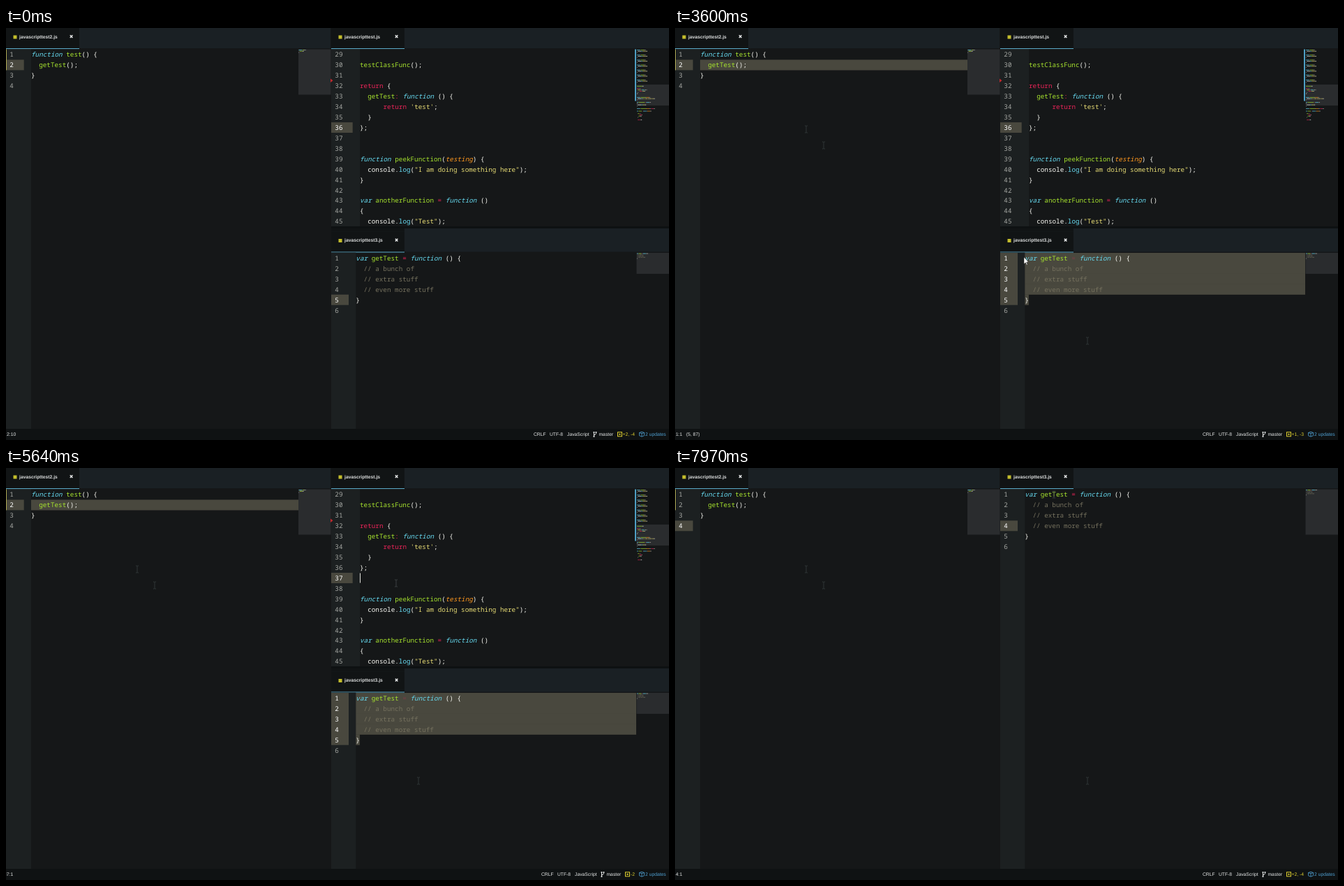
An HTML page for the animation above (8 s loop, 950 by 590 pixels).

```html
<!DOCTYPE html>
<html lang="en">
<head>
<meta charset="utf-8">
<title>Split editor panes</title>
<style>
  html, body { margin: 0; width: 100%; height: 100%; overflow: hidden; background: #151718; }
  svg { display: block; width: 950px; height: 590px; }
  text { text-rendering: geometricPrecision; }
  .code text { font: 500 9.31px "Noto Sans Mono", "DejaVu Sans Mono", monospace; fill: #f8f8f2; }
  .code .num { font-weight: 400; fill: #a4a6a2; }
  .code .on { font-weight: 500; fill: #fff; }
  .ui { font: 6.75px "Liberation Sans", sans-serif; fill: #e8eaea; }
  .tab { font-weight: bold; fill: #dcdede; }
  .kw { fill: #66d9ef; font-style: italic; }
  .fn { fill: #66d9ef; }
  .red { fill: #ea2458; }
  .name { fill: #a6e22e; }
  .str { fill: #e6db74; }
  .arg { fill: #fd971f; font-style: italic; }
  .note { fill: #75715e; }
  .plain { fill: #f8f8f2; }
  .yellow { fill: #dfd02f; }
  .blue { fill: #4f9fd0; }
</style>
</head>
<body>
<svg viewBox="0 0 950 590"><g id="scene"></g><g id="pointer"></g></svg>
<script>
const LOOP = 8000, ROW = 14.94, CHAR = 5.586, MINI_ROW = 1.787, MINI_CHAR = 0.6;
const SELECTED = '#49483e', TAB_BAR = '#1a2024', VIEW = '#2a2c2e';

const leftFile = ['function test() {', '  getTest();', '}', ''];
const bottomFile = ['var getTest = function () {', '  // a bunch of', '  // extra stuff',
  '  // even more stuff', '}', ''];
const block = ['function testMore() {', '  console.log("Testing");', '}', ''];
const topFile = [...Array(7).fill(block).flat(),
  '', 'testClassFunc();', '', 'return {', '  getTest: function () {', "      return 'test';", '  }', '};',
  '', '', 'function peekFunction(testing) {', '  console.log("I am doing something here");', '}', '',
  'var anotherFunction = function ()', '{', '  console.log("Test");', '}', '',
  'function testSomething(testing) { return; }', '', 'var testLast = function (testing) {', '',
  '  test: {', '      return;', '    test();', '  }', '', '  return {};'];

const KINDS = ['note', 'str', 'kw', 'red', 'fn', 'arg', 'name'];
const RULES = /(\/\/.*)|(".*?"|'.*?')|\b(function|var)\b|(\breturn\b|[=:])|\b(log)\b|\b(testing)\b|\b(test\w*|getTest|peekFunction|anotherFunction)\b/g;

function tokens(line) {
  const out = [];
  let at = 0;
  for (const m of line.matchAll(RULES)) {
    if (m.index > at) out.push({ text: line.slice(at, m.index), kind: 'plain', col: at });
    out.push({ text: m[0], kind: KINDS[m.slice(1).findIndex(Boolean)], col: m.index });
    at = m.index + m[0].length;
  }
  if (at < line.length) out.push({ text: line.slice(at), kind: 'plain', col: at });
  return out;
}

const rect = (x, y, w, h, fill, extra = '') =>
  `<rect x="${x}" y="${y}" width="${w}" height="${h}" fill="${fill}" ${extra}/>`;
const label = (x, y, text, cls = '', extra = '') =>
  `<text x="${x}" y="${y}" class="ui ${cls}" ${extra}>${text}</text>`;

function tab(x, y, width, title) {
  return rect(x, y, width, 29, TAB_BAR) + rect(x, y, 105, 29, '#111415') +
    rect(x, y + 29, 105, 1, '#5aaac8') + rect(x + 10.5, y + 10.5, 5, 5, '#c4be2c') +
    label(x + 19, y + 14.5, title, 'tab') +
    `<path d="M${x + 91.8} ${y + 10.3}l3.6 3.6m0-3.6l-3.6 3.6" stroke="#f0f2f2" stroke-width="1.4"/>`;
}

function minimap(file, x, y, mark) {
  let svg = mark ? rect(x + mark.col * MINI_CHAR, y + mark.row * MINI_ROW, mark.len * MINI_CHAR, 1.8, '#5b5a4c') : '';
  file.forEach((line, i) => tokens(line).forEach(({ text, kind, col }) => {
    for (const word of text.matchAll(/\S+/g))
      svg += `<rect class="${kind}" x="${x + (col + word.index) * MINI_CHAR}" y="${y + i * MINI_ROW + 0.5}"
        width="${word[0].length * MINI_CHAR}" height="1" opacity=".65"/>`;
  }));
  return svg;
}

// sel: first and last selected row, start column, and end column when the last row is only partly covered.
function editor({ file, x, y, codeX, right, bottom, first = 1, active, sel }) {
  const rowY = n => y + (n - first) * ROW;
  const visible = file.slice(first - 1, first + Math.floor((bottom - y) / ROW));
  const isOn = n => n >= active[0] && n <= active[1];
  let svg = rect(x, y - 0.5, codeX - x, bottom - y + 0.5, '#1c2021');
  svg += rect(x, rowY(active[0]), codeX - x - 10.3, (active[1] - active[0] + 1) * ROW, SELECTED);
  if (sel) for (let n = sel.from; n <= sel.to; n++) {
    const start = codeX + (n === sel.from ? sel.col || 0 : 0) * CHAR;
    const end = n === sel.to && sel.endCol !== undefined ? codeX + sel.endCol * CHAR : right;
    svg += rect(start, rowY(n), end - start, ROW + 0.1, SELECTED);
  }
  visible.forEach((line, i) => {
    const n = first + i, base = rowY(n) + 10.8;
    const indent = line.length - line.trimStart().length;
    const covered = sel && n >= sel.from && n <= sel.to;
    svg += `<text x="${x + 5.3}" y="${base}" class="num ${isOn(n) ? 'on' : ''}">${n}</text>`;
    svg += `<text x="${codeX + indent * CHAR}" y="${base}">` + tokens(line.trimStart()).map(t => {
      const faded = covered && /^[=:]$/.test(t.text) ? ' fill-opacity=".3"' : '';
      return `<tspan class="${t.kind}"${faded}>${t.text}</tspan>`;
    }).join('') + '</text>';
  });
  return `<g class="code">${svg}</g>`;
}

function statusBar(s) {
  const shift = s.diff.length < 3 ? 11 : 0;
  return rect(0, 574, 950, 16, '#0f1213') +
    label(s.pos.indexOf(':') > 1 ? -3 : 1, 584, s.pos) + label(16, 584, s.range) +
    `<g transform="translate(${shift})">` +
    label(756, 584, 'CRLF') + label(779, 584, 'UTF-8') + label(804, 584, 'JavaScript') +
    `<path d="M842.5 579v6M845.5 579v1.5q0 1.5-3 2.5" fill="none" stroke="#e8eaea"/>
     <circle cx="842.5" cy="579" r="1.1" fill="#e8eaea"/><circle cx="842.5" cy="585" r="1.1" fill="#e8eaea"/>
     <circle cx="845.5" cy="579" r="1.1" fill="#e8eaea"/>` +
    label(849.5, 584, 'master') +
    rect(876.5, 578.8, 6, 6, 'none', 'stroke="#dfd02f"') + rect(878.5, 580.8, 2, 2, '#dfd02f') + '</g>' +
    label(901, 584, s.diff, 'yellow', 'text-anchor="end"') +
    `<path d="M907.5 579.5l3.5-1.2 3.5 1.2v4.3l-3.5 1.4-3.5-1.4zl3.5 1.2 3.5-1.2M911 580.7v4.4" fill="none" stroke="#4f9fd0" stroke-width=".8"/>` +
    label(916, 584, '2 updates', 'blue');
}

const beam = (x, y, color) =>
  `<path d="M${x - 2} ${y - 5}h1.5l.5.6.5-.6h1.5M${x - 2} ${y + 5}h1.5l.5-.6.5.6h1.5M${x} ${y - 4.5}v9" fill="none" stroke="${color}" stroke-width=".9"/>`;

function scene(s) {
  let svg = rect(0, 0, 950, 590, '#151718');

  svg += tab(0, 0, 465, 'javascripttest2.js');
  svg += editor({ file: leftFile, x: 0, y: 30.5, codeX: 36, right: 419, bottom: 574,
    active: [s.leftRow, s.leftRow], sel: s.leftSel });
  svg += rect(0, 30.5, 1, 2 * ROW, '#aaa550') + rect(419, 30.5, 46.5, 65, VIEW);
  svg += minimap(leftFile, 419.5, 30.5, s.leftSel && { row: 1, col: 2, len: 7 });
  if (s.gear) svg += '<path d="M450 35h7M450 37.5h7M450 40h7" stroke="#7c8082"/>';

  const lower = { file: bottomFile, x: 466, codeX: 501.3, right: 903, bottom: 574, active: s.botRows, sel: s.botSel };
  if (s.closed) {
    svg += tab(466, 0, 484, 'javascripttest3.js') + editor({ ...lower, y: 30.5 });
    svg += rect(903.5, 30.5, 46.5, 65, VIEW) + minimap(bottomFile, 904, 30.5);
  } else {
    svg += tab(466, 0, 484, 'javascripttest.js');
    svg += editor({ file: topFile, x: 466, y: 30.5, codeX: 507, right: 903, bottom: 284, first: 29,
      active: s.topRows, sel: s.topSel });
    svg += rect(903.5, 81, 46.5, 30, VIEW) + minimap(topFile, 904, 30.5);
    svg += rect(901, 30.5, 2, 74, '#4f9fc4');
    svg += '<path d="M465 72.5l3.5 2.8-3.5 2.8z" fill="#c0282d"/>';
    svg += rect(466, 284, 484, 3, '#0e1112') + rect(466, 287, 105, 5, '#111415') + rect(571, 287, 379, 5, TAB_BAR);
    svg += tab(466, 291.5, 484, 'javascripttest3.js') + editor({ ...lower, y: 322 });
    svg += rect(903.5, 322, 46.5, 30, VIEW) + minimap(bottomFile, 904, 322);
  }
  if (s.caret) svg += rect(s.caret[0], s.caret[1], 1, 14, '#e0e0da');
  svg += s.trail.map(([x, y]) => beam(x, y, '#353a3b')).join('');
  return svg + statusBar(s);
}

const start = { pos: '2:10', range: '', diff: '+2, -4', leftRow: 2, leftSel: null, topRows: [36, 36], topSel: null,
  botRows: [5, 5], botSel: null, caret: null, gear: false, closed: false, trail: [] };
const pickBottom = (row, chars) => ({ pos: row + ':1', range: `(${6 - row}, ${chars})`, botRows: [row, 5],
  botSel: { from: row, to: 5, endCol: 1 } });
const pickTop = (row, chars, col = 0) => ({ pos: `${row}:${col + 1}`, range: `(${38 - row}, ${chars})`,
  topRows: [row, 36], topSel: { from: row, to: 36, col } });
const BOTTOM_CARET = { caret: [562, 367] }, NO_CARET = { caret: null };

const STEPS = [
  [460, { trail: [[591, 448]] }],
  [920, { trail: [[591, 448], [213, 168]] }],
  [1380, { pos: '2:9' }],
  [1540, { pos: '2:10', range: '(1, 7)', leftSel: { from: 2, to: 2, col: 2, endCol: 9 },
    trail: [[591, 448], [213, 168], [188, 145]] }],
  [1700, { pos: '3:1', range: '(2, 14)', leftSel: { from: 2, to: 2 } }],
  [2400, { gear: true }],
  [2560, { gear: false }],
  [3210, { pos: '5:2', range: '', diff: '+1, -3' }],
  [3290, pickBottom(4, 23)],
  [3370, pickBottom(3, 41)],
  [3450, pickBottom(2, 58)],
  [3530, pickBottom(1, 87)],
  [4230, { pos: '37:1', range: '', diff: '-2', topRows: [37, 37] }],
  [4310, pickTop(36, 4)],
  [4390, pickTop(35, 9)],
  [4470, pickTop(34, 31)],
  [4560, pickTop(33, 55, 2)],
  [5640, { pos: '37:1', range: '', topRows: [37, 37], topSel: null, caret: [507, 150.5] }],
  [5950, NO_CARET],
  [6030, { pos: '4:12', diff: '+1, -3', botRows: [4, 4], botSel: null, ...BOTTOM_CARET }],
  [6330, { gear: true }],
  [6410, NO_CARET],
  [6600, { gear: false, ...BOTTOM_CARET }],
  [6830, { pos: '4:1', diff: '+2, -4', leftRow: 4, leftSel: null, caret: [36, 75.5] }],
  [7140, { gear: true }],
  [7290, { gear: false }],
  [7570, NO_CARET],
  [7730, { closed: true }]
];

// Each move: start, end, from x, y, to x, y.
const MOVES = [
  [380, 530, 591, 448, 213, 168],
  [530, 920, 213, 168, 213, 168],
  [920, 1230, 97, 71, 83, 54],
  [1230, 2240, 83, 54, 83, 54],
  [2480, 2900, 530, 60, 567, 190],
  [2900, 3210, 567, 190, 508, 375],
  [3210, 3530, 506, 389, 503, 335],
  [3680, 3990, 503, 320, 569, 188],
  [4230, 4560, 512, 158, 518, 98],
  [4560, 5160, 518, 98, 518, 98],
  [5160, 5480, 518, 98, 559, 165],
  [5480, 5720, 559, 165, 559, 165],
  [5720, 6030, 559, 165, 562, 374],
  [7900, 8000, 543, 38, 543, 38]
];

function pointer(t) {
  if (t >= 3530 && t < 3680)
    return '<path d="M500 328v10l2.3-2 1.5 3.4 1.4-.7-1.5-3.2h3z" fill="#fff" stroke="#111" stroke-width=".5"/>';
  const move = MOVES.find(([from, to]) => t >= from && t < to);
  if (!move) return '';
  const [from, to, x0, y0, x1, y1] = move;
  const p = Math.min(1, Math.floor((t - from) / 78) * 78 / (to - from));
  return beam(x0 + (x1 - x0) * p, y0 + (y1 - y0) * p, '#414648');
}

const sceneNode = document.getElementById('scene'), pointerNode = document.getElementById('pointer');
let shownStep = -1, shownPointer = null;

function frame() {
  const t = performance.now() % LOOP;
  const step = STEPS.filter(([at]) => at <= t).length;
  if (step !== shownStep) {
    sceneNode.innerHTML = scene(Object.assign({}, start, ...STEPS.slice(0, step).map(([, change]) => change)));
    shownStep = step;
  }
  const mark = pointer(t);
  if (mark !== shownPointer) pointerNode.innerHTML = shownPointer = mark;
  requestAnimationFrame(frame);
}
frame();
</script>
</body>
</html>
```
